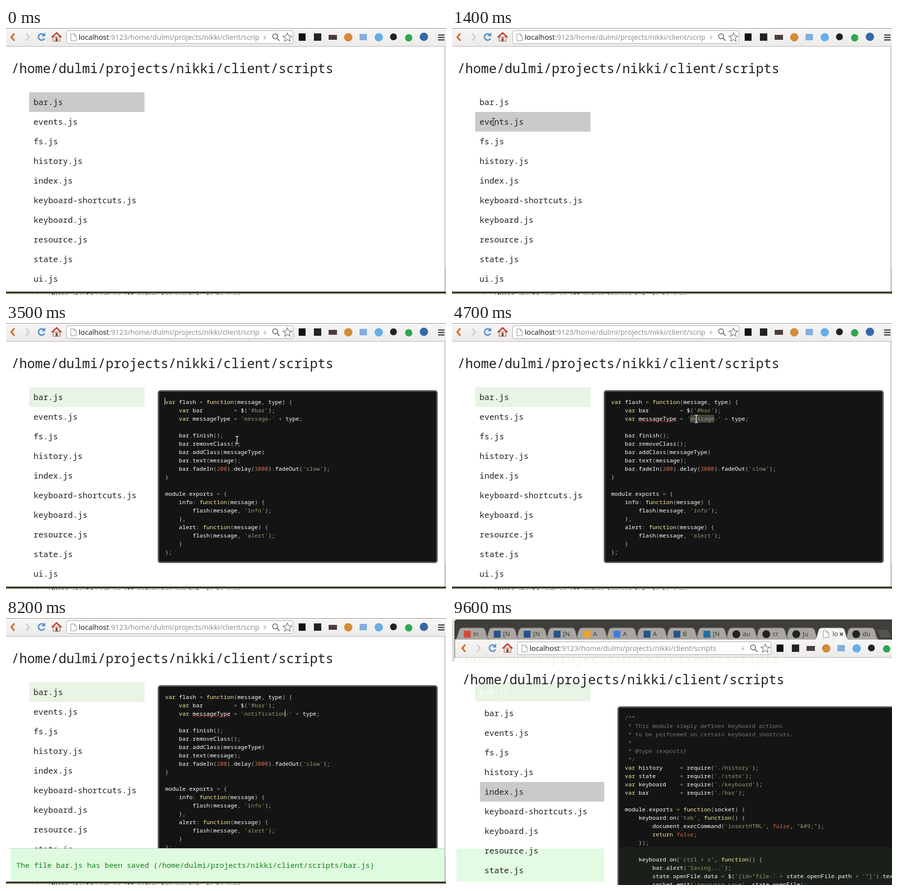
An HTML page with a canvas for the animation above (9.7 s loop, 896x544 px).

```html
<!DOCTYPE html>
<html lang="en">
<head>
<meta charset="utf-8">
<title>File editor</title>
<style>
html, body { margin: 0; width: 100%; height: 100%; overflow: hidden; background: #fff; }
canvas { display: block; }
</style>
</head>
<body>
<canvas id="stage" width="896" height="544"></canvas>
<script>
const ctx = document.getElementById('stage').getContext('2d');
const LOOP = 9700, STEP = 100, CHAR = 7, LINE = 17;
const MONO = '"Noto Sans Mono", monospace';
const SANS = '"Open Sans", sans-serif';
const DIR = '/home/dulmi/projects/nikki/client/scripts';
const FILES = ['bar', 'events', 'fs', 'history', 'index', 'keyboard-shortcuts',
  'keyboard', 'resource', 'state', 'ui'].map(name => name + '.js');
const WORD = 'notification';
const T = { enter: 1000, open: 2150, focus: 4200, select: 4500, type: 5200, key: 150,
  hide: 7000, saved: 7600, window: 8600 };

const barCode = word => `var flash = function(message, type) {
    var bar         = $('#bar');
    var messageType = '${word}-' + type;

    bar.finish();
    bar.removeClass();
    bar.addClass(messageType)
    bar.text(message);
    bar.fadeIn(200).delay(3000).fadeOut('slow');
}

module.exports = {
    info: function(message) {
        flash(message, 'info');
    },
    alert: function(message) {
        flash(message, 'alert');
    }
};`;

const shortcutCode = `/**
 * This module simply defines keyboard actions
 * to be performed on certain keyboard shortcuts.
 *
 * @type {exports}
 */
var history     = require('./history');
var state       = require('./state');
var keyboard    = require('./keyboard');
var bar         = require('./bar');

module.exports = function(socket) {
    keyboard.on('tab', function() {
        document.execCommand('insertHTML', false, "&#9;");
        return false;
    });

    keyboard.on('ctrl + s', function() {
        bar.alert('Saving...');
        state.openFile.data = $('[id="file-' + state.openFile.path + '"]').text();
        socket.emit('resource.save', state.openFile);`;

const TOKENS = /(\/\*[\s\S]*?\*\/)|('[^'\n]*'|"[^"\n]*"|[=+])|\b(var|function|return)\b|\b(false|\d+)\b|([{}()[\];,.:])/g;
const TOKEN_COLORS = ['#777', '#8f9d6a', '#f9ee98', '#cf6a4c', '#b8b8b8'];

function rect(x, y, w, h, color) {
  ctx.fillStyle = color;
  ctx.fillRect(x, y, w, h);
}

function box(x, y, w, h, r, fill, stroke, width = 1) {
  ctx.beginPath();
  ctx.roundRect(x, y, w, h, r);
  if (fill) { ctx.fillStyle = fill; ctx.fill(); }
  if (stroke) { ctx.strokeStyle = stroke; ctx.lineWidth = width; ctx.stroke(); }
}

function disc(x, y, r, color) {
  ctx.beginPath();
  ctx.arc(x, y, r, 0, 7);
  ctx.fillStyle = color;
  ctx.fill();
}

function path(d, stroke, width, fill) {
  const p = new Path2D(d);
  if (fill) { ctx.fillStyle = fill; ctx.fill(p); }
  if (stroke) { ctx.strokeStyle = stroke; ctx.lineWidth = width; ctx.stroke(p); }
}

function text(str, x, y, size, color, family = MONO) {
  ctx.font = `${size}px ${family}`;
  ctx.fillStyle = color;
  ctx.fillText(str, x, y);
}

function at(x, y, draw) {
  ctx.save();
  ctx.translate(x, y);
  draw();
  ctx.restore();
}

function drawCode(code, x, y) {
  let row = 0, col = 0;
  const put = (str, color) => str.split('\n').forEach((part, i) => {
    if (i) { row++; col = 0; }
    text(part, x + col * CHAR, y + row * LINE, CHAR / 0.6, color);
    col += part.length;
  });
  let last = 0;
  for (const match of code.matchAll(TOKENS)) {
    put(code.slice(last, match.index), '#fff');
    put(match[0], TOKEN_COLORS[match.slice(1).findIndex(Boolean)]);
    last = match.index + match[0].length;
  }
  put(code.slice(last), '#fff');
}

function pageIcon(x, y) {
  path(`M${x - 5} ${y - 7}h7l4 4v10h-11zM${x + 2} ${y - 7}v4h4`, '#888', 1, '#fff');
}

function drawToolbar(grow, url) {
  const bg = ctx.createLinearGradient(0, 0, 0, 37);
  bg.addColorStop(0, '#f7f6f5');
  bg.addColorStop(1, '#ecebea');
  rect(-6, 1, 960, 36, bg);
  rect(-6, 37, 960, 1, '#b5b4b2');

  path('M17 11l-6 7.500 6 7.500', '#d9652a', 3.5);
  path('M41 11l6 7.500-6 7.500', '#d4d3d1', 3.5);
  path('M77.500 14a6.500 6.500 0 1 0 1 7', '#5c93cf', 3);
  path('M80 9v8h-8z', null, 0, '#5c93cf');
  path('M96 18h14v9h-14z', '#8b4a3c', 1, '#f1e6dc');
  path('M93 19l10-9 10 9', '#bf3f32', 3);
  rect(101, 20, 4, 7, '#8b4a3c');

  box(123.5, 5.5, 461 + grow, 26, 3, '#fff', '#aaa8a5');
  pageIcon(137, 19);
  text(url, 148, 24, 14.75, '#8a8a8a', SANS);
  text('localhost', 148, 24, 14.75, '#333', SANS);

  at(grow, 0, () => {
    path('M529 12l-5 8h3l-2 6 6-8h-4z', null, 0, '#c2c2c2');
    path('M553 17a5 5 0 1 0-10 0a5 5 0 1 0 10 0M552 21l5 5', '#777', 2);
    path('M573 10l2.500 6 6.500.5-5 4 1.500 6.500-5.500-3.500-5.500 3.500 1.500-6.500-5-4 6.500-.5z', '#777', 1.3, '#fff');
    rect(596, 11, 14, 15, '#111');
    rect(627, 11, 15, 15, '#222');
    rect(657, 14, 17, 10, '#4a3c3c');
    disc(697, 19, 8.5, '#d58a35');
    rect(720, 12, 15, 13, '#82aee0');
    disc(759, 19, 8.5, '#65aee8');
    disc(789, 18, 7, '#222');
    disc(820, 20, 7.5, '#2da653');
    disc(851, 18, 8.5, '#3568a8');
    for (let i = 0; i < 3; i++) rect(880, 13 + i * 5, 13, 2.5, '#444');
  });
}

function drawList(highlight, color, width) {
  text(DIR, 11, 92, 16 / 0.6, '#222');
  if (highlight >= 0) rect(47, 131 + highlight * 40, width, 40, color);
  FILES.forEach((name, i) => text(name, 56, 157 + i * 40, 10 / 0.6, '#222'));
}

function drawPanel(x, y, w, h) {
  box(x + 1.5, y + 1.5, w - 3, h - 3, 4, '#141414', '#545454', 3);
}

// Eased interpolation through [time, x, y] stops.
const STOPS = [[1000, 90, 250], [1400, 84, 191], [1500, 84, 191], [1900, 90, 152],
  [2600, 90, 152], [3500, 470, 238], [4100, 497, 195]];
function pointer(t) {
  const i = STOPS.findIndex(stop => stop[0] > t);
  if (i < 0) return STOPS[STOPS.length - 1].slice(1);
  const [t0, x0, y0] = STOPS[i - 1], [t1, x1, y1] = STOPS[i];
  let k = (t - t0) / (t1 - t0);
  k = k * k * (3 - 2 * k);
  return [x0 + (x1 - x0) * k, y0 + (y1 - y0) * k];
}

function drawPointer(x, y) {
  const beam = 'M-3 -7.500h2l1 1 1-1h2M0 -6.500v13M-3 7.500h2l1-1 1 1h2';
  const dark = x > 309;
  at(Math.round(x) + 0.5, Math.round(y) + 0.5, () => {
    if (!dark) path(beam, '#fff', 3);
    path(beam, dark ? '#eee' : '#111', 1.3);
  });
}

function drawEditor(t) {
  const typed = t < T.type ? 0 : Math.min(WORD.length, 1 + Math.floor((t - T.type) / T.key));
  drawPanel(309, 137, 570, 352);
  if (t >= T.select && !typed) rect(485, 187, 49, 16, '#444');
  drawCode(barCode(typed ? WORD.slice(0, typed) : 'message'), 324, 165);

  if (t >= T.focus) {
    let wave = 'M380 201';
    for (let i = 0; i < 19; i++) wave += `l2 ${i % 2 ? 1.5 : -1.5}l2 0`;
    path(wave, '#d03030', 1);
  }

  const lastKey = T.type + (typed - 1) * T.key;
  const since = typed ? lastKey : t < T.focus ? T.open : T.focus;
  const selected = t >= T.select && !typed;
  if (!selected && (t - since) % 1000 < 500) {
    if (t < T.focus) rect(323, 152, 1, 15, '#fff');
    else rect(485 + typed * CHAR - 1, 187, 1, 15, '#ddd');
  }
}

function drawSaved(t) {
  ctx.globalAlpha = Math.min(1, (t - T.saved + STEP) / 200);
  rect(9, 469, 884, 68, '#dffbdf');
  rect(9, 469, 884, 1, '#c4cfc4');
  text(`The file bar.js has been saved (${DIR}/bar.js)`, 21, 509, 15, '#118018');
  ctx.globalAlpha = 1;
}

function drawBackdropEdge() {
  rect(893, 38, 1, 499, '#a5a5a5');
  rect(894, 38, 2, 499, '#f0f0ee');
  rect(894, 487, 2, 50, '#d5d5d0');
  rect(0, 537, 896, 4, '#3c3b37');
  rect(0, 541, 896, 3, '#f5f7d8');
  rect(63, 541, 1, 3, '#999');
  rect(88, 541, 1, 3, '#777');
  text('Nikki should work on all modern browser but, to be sure', 93, 549, CHAR / 0.6, '#222');
}

function drawMaximized(t) {
  const opened = t >= T.open;
  const active = t >= T.enter && t < T.hide;
  const [x, y] = active ? pointer(t) : [0, 0];
  rect(0, 0, 896, 1, '#8a8986');
  drawToolbar(0, 'localhost:9123' + DIR.slice(0, -2));
  const hover = active ? Math.floor((y - 131) / 40) : 0;
  drawList(opened ? 0 : hover, opened ? '#e8f4e4' : '#cacacb', 235);
  if (opened) drawEditor(t);
  if (t >= T.saved) drawSaved(t);
  if (active) drawPointer(x, y);
  drawBackdropEdge();
}

const TABS = [['In', '#d6483c'], ['[N', '#24548c'], ['[N', '#24548c'], ['[N', '#24548c'],
  ['A', '#f0a22e'], ['A', '#3d7de0'], ['A', '#24548c'], ['B', '#24548c'], ['[N', '#1f70a5'],
  ['au', '#222', 1], ['cr', '#222', 1], ['Ju', '#222', 1], ['lo'], ['du', '#222', 1]];

function drawTab([label, color, round], i) {
  const x = 7 + i * 61, active = !color;
  path(`M${x - 4} 45q6 -1 8 -8l3 -11q2 -6 7 -6h40q5 0 7 6l3 11q2 7 8 8z`,
    '#686661', 1, active ? '#f5f4f3' : '#a9a6a1');
  if (active) {
    pageIcon(x + 22, 33);
    path(`M${x + 51} 30l6 6m0-6l-6 6`, '#555', 2);
  } else if (round) disc(x + 23, 33, 8, color);
  else rect(x + 17, 26, 14, 14, color);
  ctx.save();
  ctx.beginPath();
  ctx.rect(x, 20, active ? 48 : 54, 25);
  ctx.clip();
  text(label, x + 36, 37, 13, '#333', SANS);
  ctx.restore();
}

function drawTabbedWindow() {
  // Pale remains of the previous view.
  text(DIR, 11, 92, 16 / 0.6, '#f6f3e3');
  rect(47, 131, 235, 39, '#e8f4e4');
  text('bar.js', 56, 157, 10 / 0.6, '#fff');
  rect(9, 470, 301, 67, '#e2fbe2');

  rect(0, 0, 896, 4, '#fbfbf6');
  rect(0, 0, 115, 3, '#e9f0d6');
  rect(0, 4, 5, 85, '#dededc');
  box(5, 3, 900, 42, [5, 0, 0, 0], '#3f3e3a');
  TABS.map((tab, i) => [tab, i]).reverse().forEach(([tab, i]) => drawTab(tab, i));
  drawTab(TABS[12], 12);
  path('M868 25h20l5 14h-20z', '#5f5d58', 1, '#55534e');
  at(10, 43, () => {
    drawToolbar(55, 'localhost:9123' + DIR);
    drawList(4, '#cacacc', 253);
  });
  rect(5, 45, 1, 36, '#55544f');
  drawPanel(337, 180, 600, 400);
  rect(340, 467, 556, 77, 'rgba(130,220,130,.05)');
  drawCode(shortcutCode, 352, 207);
}

function draw(t) {
  rect(0, 0, 896, 544, '#fff');
  if (t < T.window) drawMaximized(t);
  else drawTabbedWindow();
}

const start = performance.now();
function tick() {
  const t = (performance.now() - start) % LOOP;
  draw(Math.floor(t / STEP) * STEP);
  requestAnimationFrame(tick);
}
tick();
</script>
</body>
</html>
```
